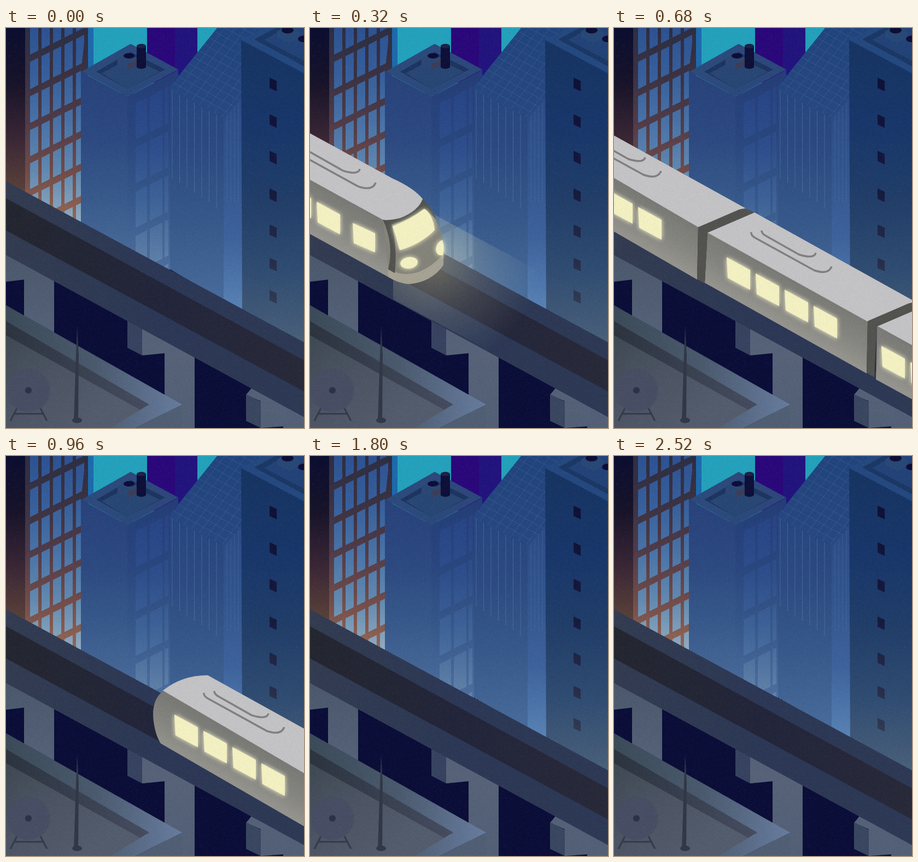
Write an HTML page with a canvas that moves like this. It is 545 px wide and 733 px high and loops after 2560 ms.

```html
<!DOCTYPE html>
<html>
<head>
<meta charset="utf-8">
<title>Night train</title>
<style>
html, body { margin: 0; width: 100%; height: 100%; overflow: hidden; background: #0a0d36 }
canvas { display: block }
</style>
</head>
<body>
<canvas id="stage" width="545" height="733"></canvas>
<script>
const W = 545, H = 733, LOOP = 2560, STEP = 40;
const stage = document.getElementById('stage').getContext('2d');
let g = stage;

function layer(draw) {
  const canvas = document.createElement('canvas');
  canvas.width = W;
  canvas.height = H;
  g = canvas.getContext('2d');
  draw();
  g = stage;
  return canvas;
}

function grad(x0, y0, x1, y1, ...colors) {
  const fill = g.createLinearGradient(x0, y0, x1, y1);
  colors.forEach((c, i) => fill.addColorStop(i / (colors.length - 1), c));
  return fill;
}

function shape(d, fill) {
  g.fillStyle = fill;
  g.fill(new Path2D(d));
}

function line(d, color, width) {
  g.strokeStyle = color;
  g.lineWidth = width;
  g.stroke(new Path2D(d));
}

function oval(x, y, rx, ry, fill, turn = 0) {
  g.fillStyle = fill;
  g.beginPath();
  g.ellipse(x, y, rx, ry, turn, 0, 7);
  g.fill();
}

function within(d, draw) {
  g.save();
  g.clip(new Path2D(d));
  draw();
  g.restore();
}

function moved(x, y, draw) {
  g.save();
  g.translate(x, y);
  draw();
  g.restore();
}

function glowing(draw) {
  g.save();
  g.shadowColor = '#fffbd0';
  g.shadowBlur = 9;
  draw();
  g.restore();
}

function sky() {
  shape('M0,0H60V340H0z', grad(0, 0, 0, 300, '#0b0d30', '#161229', '#382534', '#5a4139'));
  shape('M150,0H400V120H150z', '#23a1bc');
  shape('M148,0H160V80H148z', '#1c69ad');
  shape('M258,0H309V100H258z', '#29077a');
  shape('M309,0H350V100H309z', '#21137d');
}

function officeBlock() {
  shape('M35,0H150V360H35z', grad(0, 0, 0, 350, '#2c2d42', '#3a3142', '#503b48', '#704b49', '#946654'));
  const glass = grad(0, 0, 0, 350, '#2c5192', '#365f9c', '#4873a8', '#6189b1', '#8eabc0');
  const ledge = row => -9 + 64.5 * row - .5 * row * row;
  within('M43,0H146L137,80V360H43z', () => {
    for (let row = 0; row < 8; row++)
      for (let col = 0; col < 5; col++) {
        const x = 44 + col * 21, y = ledge(row) + 7 - col * 10.5;
        shape(`M${x},${y}l15,-7.5v${ledge(row + 1) - ledge(row) - 13}l-15,7.5z`, glass);
      }
  });
}

function glassHall() {
  const roof = 'M386,0H474L432,24V140L398,166L297,111z';
  shape(roof, grad(0, 0, 0, 160, '#20437d', '#274780'));
  within(roof, () => {
    for (let i = 0; i < 14; i++) {
      line(`M${297 + i * 14},${111 + i * 7.5}l150,-200`, '#5578ad55', 1);
      line(`M${305 + i * 9},${100 - i * 12}l140,76`, '#5578ad55', 1);
    }
  });
  shape('M297,111L398,166V500L297,440z', grad(0, 110, 0, 490, '#26447f', '#2c4b82', '#37598b', '#466a9a'));
  for (let i = 0; i < 7; i++)
    line(`M${304 + i * 13.5},${115 + i * 7.3}V${275 + i * 9}`, '#5d7fb288', 1);
  shape('M398,166L432,128V518L398,497z', grad(0, 140, 0, 510, '#2b4b87', '#31548f', '#3d629c', '#5781b4'));
  for (let i = 0; i < 4; i++)
    line(`M${404 + i * 7},${160 - i * 8}V320`, '#5d7fb255', 1);
}

function tower() {
  const wall = grad(0, 90, 0, 430, '#28427b', '#2c4981', '#385a8c', '#4b6d9b');
  shape('M137,80L222,126V410L137,356z', wall);
  shape('M222,126L315,77V88L300,108V446L222,405z', grad(0, 90, 0, 430, '#243d77', '#29467f', '#36588b', '#4b6d9d'));
  const glass = grad(0, 120, 0, 430, '#274486', '#2d4e8c', '#3f6599', '#5f80a8');
  within('M237,122L297,92V440H237z', () => {
    for (let row = 0; row < 5; row++)
      for (const [x, w] of [[237, 21], [263, 23], [290, 7]]) {
        const y = 138 + row * 81 - (x - 237) * .5;
        shape(`M${x},${y}l${w},${-w / 2}v66l${-w},${w / 2}z`, glass);
      }
  });
  shape('M138,80L228,29L315,76L222,126z', grad(138, 0, 315, 0, '#2b4b7c', '#2c467b'));
  shape('M165,80L228,44L291,76L222,111z', '#1c345f');
  shape('M175,83L228,54L281,80L222,111z', '#284674');
  shape('M204,56L222,46L240,55V68L222,76L204,67z', '#2a4674');
  shape('M222,66L240,57V68L222,76z', '#3b3d59');
  oval(225, 51, 10, 5, '#0c0d36');
  shape('M239,33H256V72Q248,78 239,72z', '#0d0f38');
  oval(247.5, 33, 8.5, 4, '#1d2148');
}

function darkTower() {
  shape('M430,22L472,0H545V90z', '#23487f');
  shape('M454,21L492,0H545V70z', '#1a3765');
  shape('M472,22L510,0H545V60z', '#224278');
  shape('M496,6L516,-4L538,8V18L518,28L496,16z', '#274776');
  oval(515, 4, 11, 6, '#0c0d35');
  oval(544, 20, 10, 6, '#0c0d35');
  shape('M430,22L545,83V580L432,520z', grad(0, 50, 0, 570, '#163463', '#17366a', '#203d69', '#2e4b71', '#485f7a'));
  const pane = grad(0, 90, 0, 500, '#0e1037', '#15183c', '#2f3952');
  for (const y of [91, 158, 225, 294, 360, 421, 480])
    shape(`M482,${y}l13,6v19l-13,-6z`, pane);
}

function viaduct() {
  shape('M0,400L545,690V733H0z', '#0a0d37');
  const pier = grad(0, 420, 0, 733, '#4b586c', '#566278', '#525f76');
  shape('M0,410L88,460V558L33,527V461L0,465z', pier);
  shape('M249,548L345,600V733H290V596L249,600z', pier);
  shape('M222,532L249,548V600L222,586z', '#364260');
  shape('M449,660L545,708V733H507V730L466,733V684L439,672z', pier);
  shape('M439,671L466,685V733L439,720z', '#39465f');
  shape('M0,281L545,576V713L0,416z', grad(0, 0, W, 0, '#323b50', '#2b3755', '#2d3854'));
  shape('M0,312L545,609V666L0,371z', grad(0, 0, W, 0, '#23262f', '#22253a', '#272939'));
}

function nearRoof() {
  shape('M0,508L322,690L237,733H0z', grad(0, 0, 322, 0, '#3b4a58', '#4a596d', '#677c9f'));
  shape('M322,690V733H237z', '#505e74');
  shape('M0,537L262,690L189,733H0z', grad(0, 0, 262, 0, '#2b333e', '#454c60'));
  shape('M0,563L246,700L189,733H0z', grad(0, 560, 150, 733, '#3e4851', '#4c5464', '#535c6d'));
  line('M20,697L8,720M63,697L75,720M15,707H68', '#333a4b', 3);
  oval(41, 664, 39.5, 39.5, '#474d63');
  oval(41, 664, 6, 6, '#2c3246');
  shape('M130,546L133,600L132,720H124L128,600z', '#303746');
  oval(130, 719, 9, 5, '#303746');
}

// Seeded paper grain laid over everything.
function grain() {
  const image = g.createImageData(W, H);
  let seed = 7;
  for (let i = 0; i < image.data.length; i += 4) {
    seed = (seed * 1664525 + 1013904223) >>> 0;
    image.data.fill(seed >>> 31 ? 255 : 0, i, i + 3);
    image.data[i + 3] = (seed >>> 16) % 9;
  }
  g.putImageData(image, 0, 0);
}

const ROOF = '#c4c3c5', GAP = '#52534f', LIT = '#f4f1c3';
// Side shading runs square to the slope; dx, dy place it in the car's own frame.
const side = (dx = 0, dy = 0) => grad(dx, 279 + dy, dx - 41, 353 + dy, '#797975', '#858580', '#96958f');

function panes(x, y, count) {
  glowing(() => {
    for (let i = 0; i < count; i++)
      shape(`M${x + i * 53},${y + i * 29.7}l43,23.5v36.5l-41,-22z`, LIT);
  });
}

function vents() {
  line('M251,374q-1,6 8,11L366,444q26,9 32,-7M270,371q0,6 8,10L338,415q28,9 31,-3', '#817f80', 3.5);
}

function coupling() {
  shape('M154,365L171,374L166,468L152,460z', GAP);
  shape('M154,365L228,333Q240,328 257,338L171,375z', GAP);
}

function tailCar() {
  moved(-423, -235, () => {
    shape('M577,600L575,696L283,527Q271,508 269,475Q269,443 289,430z', side(423, 235));
    shape('M577,600L663,565L369,402Q322,402 287,430z', ROOF);
  });
  moved(-312, -175, vents);
  panes(-115, 239, 4);
}

function middleCar() {
  shape('M171,374L464,537L462,633L166,467z', side());
  shape('M171,375L257,338L550,501L464,538z', ROOF);
  vents();
  panes(206, 420, 4);
}

function beam() {
  const glow = g.createRadialGradient(225, 425, 20, 225, 425, 195);
  glow.addColorStop(0, '#fff6b84c');
  glow.addColorStop(.45, '#efeec024');
  glow.addColorStop(1, '#dfe8d000');
  shape('M215,335L480,478L420,640L152,497V440z', glow);
}

function frontCar() {
  beam();
  shape('M-102,222L133,351L160,400L180,469Q165,467 143,456L-104,320z', side(-583, -324));
  shape('M133,351L206,313Q232,345 243,388Q247,420 243,435Q222,465 180,469Q160,466 143,442z', '#85847a');
  shape('M143,442Q195,468 244,414V434Q222,466 180,469Q160,467 143,456z', '#a6a394');
  shape('M133,351Q175,351 206,313Q222,328 231,350L208,331Q180,352 149,360Q160,400 155,449L143,442Q154,395 133,351z', GAP);
  shape('M-102,222L-16,184L150,275Q190,293 206,313Q198,335 165,348Q145,353 133,351z', ROOF);
  glowing(() => {
    shape('M151,363Q185,350 209,331Q224,340 228,370Q202,396 164,407Q158,385 151,363z', LIT);
    oval(181, 430, 16, 10.5, LIT, -.15);
    shape('M242,388Q247,405 243,416Q231,418 230,405Q232,392 242,388z', LIT);
    shape('M78,357l41,19v35l-39,-17z', LIT);
  });
  moved(-278, -154, vents);
  panes(-94, 258.5, 3);
}

function train() {
  moved(583, 324, frontCar);
  tailCar();
  middleCar();
  coupling();
  moved(310, 172, coupling);
}

const city = layer(() => {
  [sky, officeBlock, glassHall, tower, darkTower, viaduct, nearRoof].forEach(draw => draw());
});
const paper = layer(grain);

function frame() {
  const t = Math.floor(performance.now() % LOOP / STEP) * STEP;
  const dt = t - 680;
  const x = 1.558 * dt - 1.7e-4 * dt * dt;
  stage.drawImage(city, 0, 0);
  if (t > 0 && t < 1200) moved(x, x * .5553, train);
  stage.drawImage(paper, 0, 0);
  requestAnimationFrame(frame);
}
frame();
</script>
</body>
</html>
```
